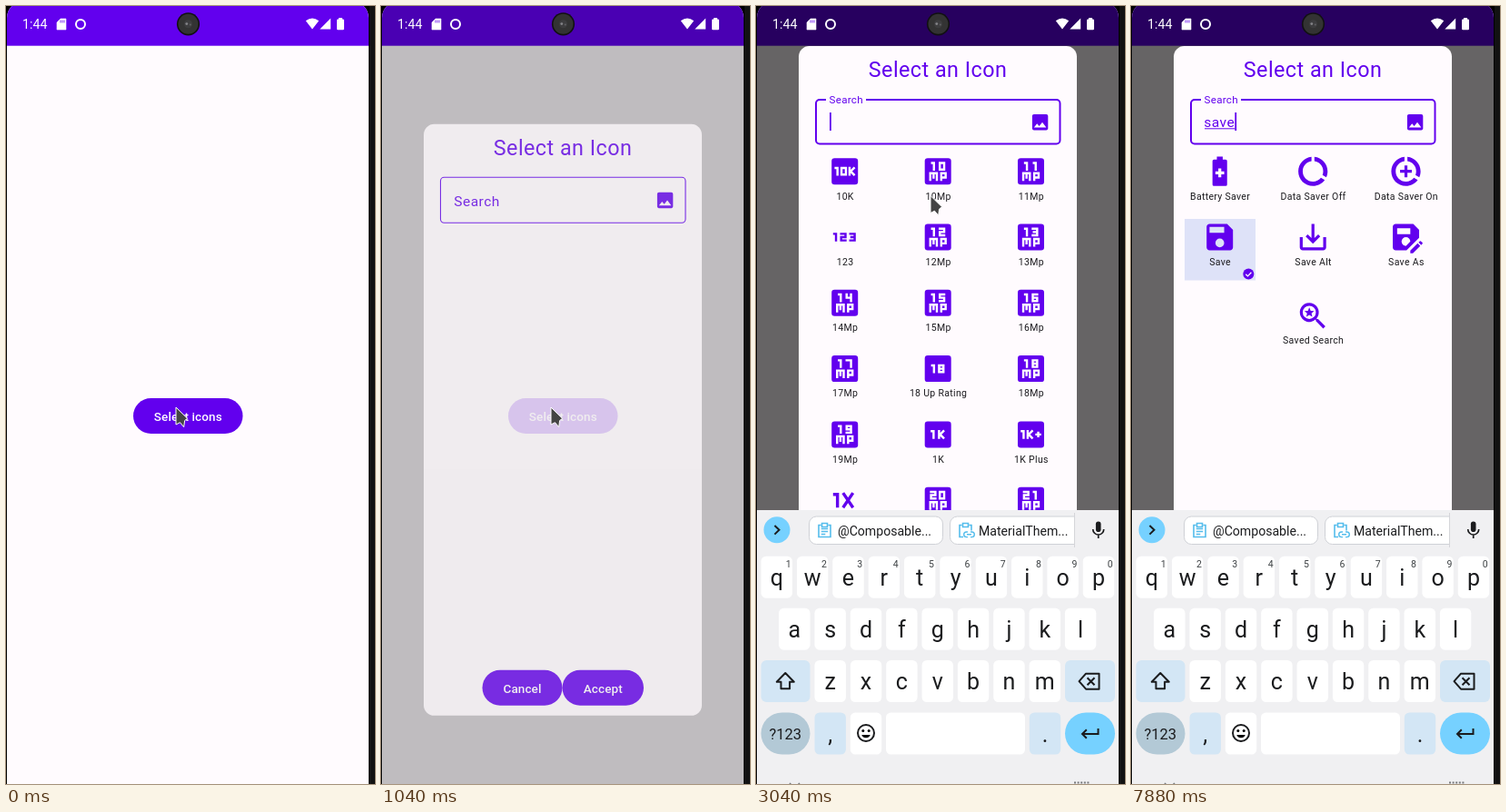
Animation of 406x855 px, one loop 8 s. Source, as an HTML page:

```html
<!DOCTYPE html>
<html lang="en">
<head>
<meta charset="utf-8">
<title>Icon picker</title>
<style>
  html, body { margin: 0; width: 100%; height: 100%; overflow: hidden; background: #0d0d0d; }
  svg { display: block; width: 406px; height: 855px; font-family: Roboto, sans-serif; }
  text { white-space: pre; }
  .mid { text-anchor: middle; }
  .label { font-size: 10.5px; letter-spacing: .32px; fill: #1c1b1f; text-anchor: middle; }
  .btn { font-size: 13.5px; font-weight: 500; letter-spacing: .1px; fill: #fff; text-anchor: middle; }
  .key { font-size: 25px; fill: #1b1c1e; text-anchor: middle; }
  .hint { font-size: 10.5px; fill: #3c4043; text-anchor: middle; }
  .chip { font-size: 14.1px; fill: #1b1c1e; }
  .line { fill: none; stroke: #1b1c1e; stroke-width: 2; }
</style>
</head>
<body>
<svg id="stage" viewBox="0 0 406 855"></svg>
<script>
const ACCENT = '#6200ee', PAPER = '#fffbfe', SKY = '#76d1ff', PALE = '#d3e6f5';
const COLS = [97.7, 200.2, 302.5], ROW = 72.3, LIFT = 81;

const rect = (x, y, w, h, r, fill, more = '') =>
  `<rect x="${x}" y="${y}" width="${w}" height="${h}" rx="${r}" fill="${fill}" ${more}/>`;
const text = (x, y, s, cls = '', more = '') => `<text x="${x}" y="${y}" class="${cls}" ${more}>${s}</text>`;
const path = (d, more = '') => `<path d="${d}" ${more}/>`;
const group = (id, body, more = '') => `<g id="${id}" ${more}>${body}</g>`;
const button = (x, y, w, s) => rect(x, y, w, 39, 19.5, ACCENT) + text(x + w / 2, y + 24.8, s, 'btn');

// Block glyphs on a 3 x 4.5 centre line
const GLYPH = {
  0: 'M0 0h3v4.5h-3z', 1: 'M0 0h2v5.25', 2: 'M-.75 0H3v2.25H0V4.5h3.75',
  3: 'M-.75 0H3V4.5H-.75M0 2.25h3', 4: 'M0-.75v3h3M3-.75v6', 5: 'M3.75 0H0v2.25h3V4.5h-3.75',
  6: 'M3.75 0H0v4.5h3v-2.25h-3', 7: 'M-.75 0H3v5.25', 8: 'M0 0h3v4.5h-3zM0 2.25h3',
  9: 'M3 2.25H0V0h3v4.5h-3.75', K: 'M0-.75v6M3.5-.5L.7 2.25 3.5 5', '+': 'M-.5 2.25h4M1.5.25v4'
};
const glyphs = (s, xs, y, color) => [...s].map((c, i) =>
  path(GLYPH[c], `transform="translate(${xs[i]} ${y})" fill="none" stroke="${color}" stroke-width="1.5"`)).join('');
const tile = rect(3, 3, 18, 18, 2, ACCENT);
const mp = path('M6.75 18.5v-5.25h4.5v5.25M9 13.25v3.75M14.25 18.5v-5.25h3v3h-3',
  'fill="none" stroke="#fff" stroke-width="1.5"');

const SAVER = 'M13 2.05v3.03c3.39.49 6 3.39 6 6.92 0 .9-.18 1.75-.48 2.54l2.6 1.53c.56-1.24.88-2.62.88-4.07 0-5.18-3.95-9.45-9-9.95zM12 19c-3.87 0-7-3.13-7-7 0-3.53 2.61-6.43 6-6.92V2.05c-5.06.5-9 4.76-9 9.95 0 5.52 4.47 10 9.99 10 3.31 0 6.24-1.61 8.06-4.09l-2.6-1.53C16.17 17.98 14.21 19 12 19z';
const SHAPES = {
  'Battery Saver': 'M16 4h-2V2h-4v2H8q-1 0-1 1v16q0 1 1 1h8q1 0 1-1V5q0-1-1-1zm-1 10h-2v2h-2v-2H9v-2h2v-2h2v2h2z',
  'Data Saver Off': SAVER,
  'Data Saver On': SAVER + 'M11 8v3H8v2h3v3h2v-3h3v-2h-3V8z',
  'Save': 'M17 3H5c-1.1 0-2 .9-2 2v14c0 1.1.9 2 2 2h14c1.1 0 2-.9 2-2V7zm-5 16a3 3 0 1 1 0-6 3 3 0 0 1 0 6zm3-10H5V5h10z',
  'Save Alt': 'M19 12v7H5v-7H3v7c0 1.1.9 2 2 2h14c1.1 0 2-.9 2-2v-7zm-6 .67l2.59-2.58L17 11.5l-5 5-5-5 1.41-1.41L11 12.67V3h2z',
  'Save As': 'M21 12.4V7l-4-4H5c-1.1 0-2 .9-2 2v14c0 1.1.9 2 2 2h7.4zM15 15l-3 3a3 3 0 1 1 3-3zM6 6h9v4H6zM20 16.25l1.77 1.77-5 4.98H15v-1.77zM23.25 16.5l-.85.86-1.77-1.77.85-.85q.35-.3.7 0l1.07 1.06q.3.35 0 .7z',
  'Saved Search': 'M15.5 14h-.79l-.28-.27A6.5 6.5 0 1 0 13.73 14.43l.27.28v.79l5 4.99L20.49 19zm-6 0a4.5 4.5 0 1 1 0-9 4.5 4.5 0 0 1 0 9zM9.5 6.2l.95 2.2 2.35.2-1.8 1.55.55 2.3-2.05-1.2-2.05 1.2.55-2.3L6.2 8.6l2.35-.2z'
};

function art(name) {
  if (SHAPES[name]) return path(SHAPES[name], `fill="${ACCENT}" fill-rule="evenodd"`);
  if (name.endsWith('Mp')) return tile + glyphs(name.slice(0, 2), [7.25, 13.25], 6.25, '#fff') + mp;
  switch (name) {
    case '10K': return tile + glyphs('10K', [5, 9.75, 15.25], 9.75, '#fff');
    case '123': return glyphs('123', [4, 9.5, 15.75], 9.75, ACCENT);
    case '1K': return tile + glyphs('1K', [7, 12.75], 9.75, '#fff');
    case '1K Plus': return tile + glyphs('1K+', [5, 9.75, 15.5], 9.75, '#fff');
    case '18 Up Rating': return tile + glyphs('18', [7.3, 12.75], 9.75, '#fff');
  }
  return path('M4 8h3v9M10.8 7l6.8 10M17.6 7l-6.8 10', `fill="none" stroke="${ACCENT}" stroke-width="2.1"`);
}
const cell = (name, col, row) => {
  const x = COLS[col], y = 262.7 + ROW * row;
  return `<g transform="translate(${x - 19.33} ${y - 19.33}) scale(1.611)">${art(name)}</g>` +
    text(x + .4, y + 30.8, name, 'label');
};
const NAMES = ('10K,10Mp,11Mp,123,12Mp,13Mp,14Mp,15Mp,16Mp,17Mp,18 Up Rating,18Mp,' +
  '19Mp,1K,1K Plus,1X Mobiledata,20Mp,21Mp,22Mp,23Mp,24Mp').split(',');
const FOUND = ['Battery Saver', 'Data Saver Off', 'Data Saver On', 'Save', 'Save Alt', 'Save As'];
const grid = names => names.map((n, i) => cell(n, i % 3, Math.floor(i / 3))).join('');

const field =
  group('idle', rect(65.5, 183.5, 269.5, 50, 4, 'none', `stroke="${ACCENT}" stroke-width="1.1"`) +
    text(80.3, 215.5, 'Search', '', `font-size="15.5" letter-spacing=".48" fill="${ACCENT}"`)) +
  group('focus', rect(66, 184, 268.5, 48.5, 4, 'none', `stroke="${ACCENT}" stroke-width="2"`) +
    rect(77, 181, 44, 6, 0, PAPER) +
    text(80.5, 187.8, 'Search', '', `font-size="11.6" letter-spacing=".3" fill="${ACCENT}"`) +
    text(80.3, 214, '', '', `id="typed" font-size="15.5" letter-spacing=".48" fill="${ACCENT}"`) +
    rect(81, 215.3, 0, 1, 0, ACCENT, 'id="under"') + rect(81, 198, 1.8, 20, 0, ACCENT, 'id="caret"')) +
  path('M21 19V5c0-1.1-.9-2-2-2H5c-1.1 0-2 .9-2 2v14c0 1.1.9 2 2 2h14c1.1 0 2-.9 2-2zM8.5 13.5l2.5 3 3.5-4.5 4.5 6H5z',
    `fill="${ACCENT}" fill-rule="evenodd" transform="translate(301 197.1) scale(.967)"`);

const results = group('results',
  group('picked', rect(59, 315, 78, 67.5, 0, '#dee2f8') +
    `<circle cx="129.3" cy="375.6" r="6" fill="${ACCENT}"/>` +
    path('M126.3 375.8l2.1 2.1 4-4.2', 'fill="none" stroke="#fff" stroke-width="1.3"')) +
  grid(FOUND) + group('saved', cell('Saved Search', 1, 2)));

const dialog = group('dialog',
  rect(47, 125, 306, 650, 11.6, PAPER) +
  text(200, 159.2, 'Select an Icon', 'mid', `font-size="23.3" letter-spacing=".48" fill="${ACCENT}"`) +
  field + group('list', grid(NAMES), 'clip-path="url(#listClip)"') + results +
  button(111.5, 725, 88, 'Cancel') + button(199.5, 725, 89.5, 'Accept'));

const key = (cx, y, c, fill = '#fff', w = 34.4) =>
  rect(cx - w / 2, y, w, 46, 5.5, fill) + text(cx, y + 32, c, 'key');
const keyRow = (s, x, y) => [...s].map((c, i) => key(x + i * 39.35, y, c)).join('');
const board = (x, y) => path('M-4-5.5h-2.5v13h13v-13H4M-3-7.5h6v4h-6z',
  `fill="none" stroke="#55bdec" stroke-width="1.6" transform="translate(${x} ${y})"`);
const chip = (x, s) => rect(x, 561, 147, 30.5, 8, '#fff', 'stroke="#cfd1d6"') + text(x + 31.5, 582, s, 'chip');

const keyboard = group('keyboard',
  rect(1, 554, 398, 301, 0, '#f0f0f2') +
  `<circle cx="23" cy="575.7" r="14.5" fill="${SKY}"/>` + path('M20.5 571l5 4.8-5 4.8', 'class="line"') +
  chip(58.5, '@Composable...') + board(75.5, 576) +
  path('M71.8 574.5h7.4m-7.4 3h7.4m-7.4 3h4.5', 'stroke="#55bdec" stroke-width="1.3"') +
  `<g clip-path="url(#chipClip)">${chip(213.5, 'MaterialThem...')}</g>` +
  path('M350.5 557v38', 'stroke="#d4d5d9"') + board(230.5, 576) +
  rect(228, 576.5, 13, 9, 0, '#fff') +
  path('M233 578h-1.5a2.8 2.8 0 0 0 0 5.6h1.5m3-5.6h1.5a2.8 2.8 0 0 1 0 5.6H236m-4-2.8h5',
    'fill="none" stroke="#55bdec" stroke-width="1.4"') +
  rect(373.9, 566.5, 5.6, 11.5, 2.8, '#1b1c1e') +
  path('M370.7 575a6 6 0 0 0 12 0M376.7 581v4', 'class="line" style="stroke-width:1.7"') +
  keyRow('qwertyuiop', 22.8, 604.7) +
  [...'1234567890'].map((c, i) => text(35.6 + i * 39.35, 617, c, 'hint')).join('') +
  keyRow('asdfghjkl', 42.3, 661.7) + keyRow('zxcvbnm', 81.7, 719) +
  rect(5.5, 719, 54, 46, 6, PALE) + rect(340, 719, 55, 46, 6, PALE) +
  path('M32.3 733l-9.5 9.7h4.7v7.6h9.6v-7.6h4.7z', 'class="line" stroke-linejoin="round"') +
  path('M363 733.7h14.5v17H363l-7.5-8.5zM364.5 738.2l8 8m0-8l-8 8', 'class="line" stroke-linejoin="round"') +
  rect(5.5, 776.5, 54, 46, 23, '#b3c9d6') +
  text(32.3, 806, '?123', 'mid', 'font-size="16.5" fill="#1b1c1e"') +
  key(81.7, 776.5, ',', PALE) + key(121, 776.5, '') + key(219.5, 776.5, '', '#fff', 153) +
  key(318, 776.5, '.', PALE) + rect(340, 776.5, 55, 46, 23, SKY) +
  '<circle cx="121" cy="799" r="9" class="line"/><circle cx="117.8" cy="796.5" r="1.5"/><circle cx="124.2" cy="796.5" r="1.5"/>' +
  path('M116.3 801a5 5 0 0 0 9.4 0z') +
  path('M376.5 794v6H359m4.8-4.8L359 800l4.8 4.8', 'class="line"') +
  path('M350 853.5h17', 'stroke="#77797c" stroke-width="2" stroke-dasharray="2 1.6"') +
  path('M37 854l2 2m9-2l-2 2', 'stroke="#77797c" stroke-width="1.5"'));

const status =
  text(18, 25, '1:44', '', 'font-size="14.2" fill="#fff"') +
  path('M60 14h6v12h-10v-8z', 'fill="#fff" stroke="#fff" stroke-linejoin="round" stroke-width=".6"') +
  path('M60 15.5v3m2-3v3m2-3v3', `stroke="${ACCENT}" stroke-width=".8"`) +
  '<circle cx="82" cy="20" r="5" fill="none" stroke="#fff" stroke-width="2"/>' +
  path('M329.8 16.3q7.2-5.6 14.4 0L337 25.4zM357.2 13.5v12H345.3z', 'fill="#fff"') +
  rect(364, 14.6, 8, 11.6, 1.2, '#fff') + rect(366, 13, 4, 3, 0, '#fff') +
  '<circle cx="200.5" cy="19.8" r="12.6" fill="#111"/><circle cx="200.5" cy="19.8" r="11" fill="#333"/>' +
  '<circle cx="200.5" cy="19.8" r="4.5" fill="#3d3d3f"/><circle cx="198.8" cy="19.6" r="1.4" fill="#858589"/><circle cx="202.8" cy="20.6" r="1" fill="#606064"/>';

document.getElementById('stage').innerHTML = `<defs>
  <clipPath id="screenClip"><rect x="1" y="-5" width="398" height="900" rx="18"/></clipPath>
  <clipPath id="listClip"><rect x="47" y="240" width="306" height="481"/></clipPath>
  <clipPath id="chipClip"><rect x="210" y="555" width="140.5" height="40"/></clipPath>
  <clipPath id="buttonClip"><rect x="140" y="431" width="120.5" height="39" rx="19.5"/></clipPath></defs>` +
  rect(0, 0, 406, 855, 0, '#000') + rect(400, 0, 6, 855, 0, '#121212') +
  group('screen', rect(1, -5, 398, 900, 0, PAPER) + rect(1, -5, 398, 48.7, 0, ACCENT) +
    button(140, 431, 120.5, 'Select icons') +
    '<circle id="ripple" cx="187" cy="441" r="0" fill="#fff" opacity=".12" clip-path="url(#buttonClip)"/>' +
    rect(1, -5, 398, 900, 0, '#000', 'id="dim"') + dialog + keyboard + status,
    'clip-path="url(#screenClip)"') +
  path('M0 0V19L4.5 16.7 8.7 21.7 9.6 14.6 12.6 12.3Z',
    'id="pointer" fill="#444" stroke="#fff" stroke-width="1" stroke-linejoin="round"');

const el = {};
document.querySelectorAll('[id]').forEach(e => el[e.id] = e);
const set = (id, name, v) => el[id].setAttribute(name, v);
const show = (id, on) => set(id, 'display', on ? 'inline' : 'none');
const clamp = v => Math.min(1, Math.max(0, v));

const STEPS = [0, 750, 790, 830, 880, 920, 960, 1000, 1040, 1080, 1210, 1290, 1460,
  1790, 3040, 3420, 4080, 5250, 5540, 6130, 7290, 7460, 7880];
const POINTER = [[0, 187, 441], [1210, 188, 400], [1290, 190, 280], [1460, 192, 181], [1790, 192, 208.5],
  [5540, 95.5, 234], [6130, 92, 254], [7290, 49.5, 834], [7460, 50, 842], [7880, -50, -50]];
const last = (list, t, at) => list.filter(v => at(v) <= t).pop();

function render(time) {
  const t = last(STEPS, time, v => v);
  const open = clamp((t - 875) / 217), typing = t >= 3040;
  set('ripple', 'r', t < 750 ? 0 : 15 + 85 * clamp((t - 750) / 225));
  set('dim', 'opacity', .6 * clamp((t - 950) / 214));
  set('dialog', 'opacity', open);
  set('dialog', 'transform', `translate(0 ${typing ? -LIFT : 20 * (1 - open)})`);
  show('idle', !typing);
  show('focus', typing);
  show('keyboard', typing);
  show('list', t >= 1790 && t < 5250);
  show('results', t >= 5250);
  show('picked', t >= 7290);
  set('saved', 'transform', `translate(0 ${t >= 7290 ? 14.4 : 0})`);

  const word = t >= 4080 ? 'save' : t >= 3420 ? 'sa' : '';
  const end = { '': 81, sa: 98, save: 114.3 }[word];
  if (el.typed.textContent !== word) el.typed.textContent = word;
  set('under', 'width', end - 81);
  set('caret', 'x', end);
  show('caret', !(t >= 5540 && t < 6130 || t >= 7290 && t < 7880));

  const [, x, y] = last(POINTER, t, p => p[0]);
  set('pointer', 'transform', `translate(${x} ${y})`);
}

const start = performance.now();
function tick() {
  render((performance.now() - start) % 8000);
  requestAnimationFrame(tick);
}
tick();
</script>
</body>
</html>
```
